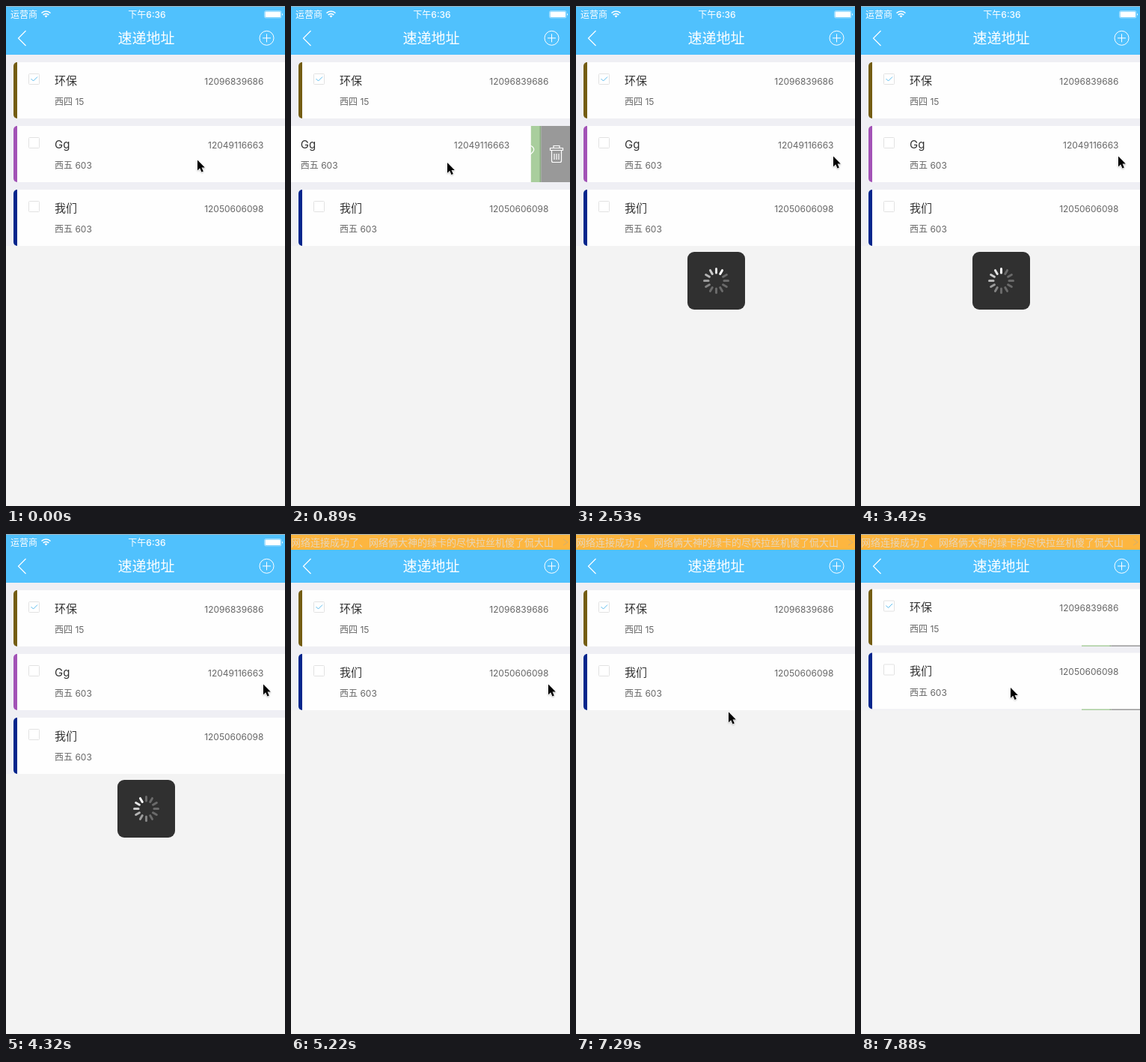
Recreate the animation shown at these times as an HTML page. Size 373x667 px, loop 8000 ms.

```html
<!DOCTYPE html>
<html lang="zh-CN">
<head>
<meta charset="utf-8">
<title>速递地址</title>
<style>
  html, body { margin: 0; width: 100%; height: 100%; overflow: hidden; background: #f3f3f3; }
  svg { display: block; }
  text { font-family: Inter, "Noto Sans CJK SC", "Noto Sans CJK", sans-serif; white-space: pre; }
  .name { font-size: 15px; fill: #333; }
  .info { font-size: 12px; fill: #666; }
  .title { font-size: 19px; font-weight: 300; fill: #fff; }
  .status { font-size: 12px; fill: #fff; }
  .notice { font-size: 13px; font-weight: 300; fill: #e6d6ba; }
  .line { fill: none; stroke: #fff; stroke-width: 1.2; }
</style>
</head>
<body>
<svg width="373" height="667" viewBox="0 0 373 667">
  <defs>
    <linearGradient id="edge">
      <stop offset="0" stop-opacity="0"/>
      <stop offset="1" stop-opacity=".25"/>
    </linearGradient>
    <g id="menu">
      <rect x="295" width="39.5" height="75" fill="#a9ce9d"/>
      <rect x="331.5" width="3" height="75" fill="url(#edge)"/>
      <rect x="334.5" width="39" height="75" fill="#999"/>
      <g class="line">
        <path d="M316.5 27.5a5 5 0 0 1 7 7L312.5 45.5l-8.5 1.5 1.5-8.5z"/>
        <path d="M346.5 29.5h17v3h-17zM351 29.5v-3h8v3M348.500 32.500v14q0 2 2 2h9q2 0 2-2v-14M352 37v8M355 37v8M358 37v8"/>
      </g>
    </g>
  </defs>

  <rect width="373" height="667" fill="#f3f3f3"/>
  <g id="rows"></g>

  <rect width="373" height="65" fill="#50c1fd"/>
  <text class="status" x="6" y="15.5" font-weight="300">运营商</text>
  <path class="line" d="M47.5 9.5a8.5 8.5 0 0 1 12 0M49.7 11.9a5.4 5.4 0 0 1 7.6 0" style="stroke-width:1.7"/>
  <path d="M53.5 15.5l-2-2.2q2-1.6 4 0z" fill="#fff"/>
  <text class="status" x="188.5" y="15.5" text-anchor="middle" font-weight="500">下午6:36</text>
  <rect x="345.5" y="6.5" width="22.5" height="9.5" rx="2" fill="none" stroke="#fff" stroke-opacity=".45"/>
  <rect x="346.5" y="7.5" width="20.5" height="7.5" rx="1" fill="#fff"/>
  <path d="M369 9.7q2 1.5 0 3z" fill="#fff"/>

  <path class="line" d="M26.5 33L16.5 43l10 10"/>
  <text class="title" x="187.5" y="50" text-anchor="middle">速递地址</text>
  <g class="line" style="stroke-width:1">
    <circle cx="348.5" cy="42.800" r="9.5"/>
    <path d="M343 42.800h11M348.5 37.300v11"/>
  </g>

  <g id="banner">
    <rect y="1" width="373" height="20" fill="#fdb640"/>
    <text class="notice" x="0" y="16">网络连接成功了、网络俩大神的绿卡的尽快拉丝机傻了侃大山</text>
    <path d="M364 7l6 4-6 4" fill="none" stroke="#d3b070"/>
  </g>
  <rect width="373" height="1" fill="#a3b4bd"/>

  <g id="hud">
    <rect x="149" y="328" width="77" height="77" rx="9" fill="#303030"/>
    <g id="spinner" transform="translate(187.5 366.5)" stroke="#fff" stroke-width="3" stroke-linecap="round"></g>
  </g>

  <path id="cursor" d="M.5 1V14.800L3.700 11.800 6 17 8.300 16 6 11H10.300Z"
        stroke="#fff" paint-order="stroke" style="filter:drop-shadow(0 1px 1px #0004)"/>
</svg>

<script>
const LOOP = 8000, STEP = 148.8, LEAD = 9;
const $ = id => document.getElementById(id);
const shift = (el, x, y) => el.setAttribute('transform', `translate(${x} ${y})`);
const fade = (el, alpha) => el.setAttribute('opacity', alpha);
const mix = (a, b, p) => a + (b - a) * p;
const ramp = (k, from, to) => Math.min(1, Math.max(0, (k - from) / (to - from)));
const ease = (k, from, to) => {
  const p = ramp(k, from, to);
  return p * p * (3 - 2 * p);
};

const contacts = [
  { name: '环保', phone: '12096839686', place: '西四 15', color: '#735c12', checked: true },
  { name: 'Gg', phone: '12049116663', place: '西五 603', color: '#a252b6' },
  { name: '我们', phone: '12050606098', place: '西五 603', color: '#00258c' },
];

$('rows').innerHTML = contacts.map(c => `
  <g>
    <rect y="-10" width="373" height="85" fill="#efeff4"/>
    <use href="#menu"/>
    <g>
      <rect x="15" width="358" height="75" fill="#fefefe"/>
      <path d="M15 0V75a5 5 0 0 1-5-5V5a5 5 0 0 1 5-5" fill="${c.color}"/>
      <rect x="30.5" y="15.5" width="14" height="14" rx="1" fill="#fff" stroke="#e2e2e2"/>
      ${c.checked ? '<path d="M33.5 22l3 3 5.5-5.5" fill="none" stroke="#5bbcee"/>' : ''}
      <text class="name" x="65" y="29.700">${c.name}</text>
      <text class="info" x="65" y="57.300">${c.place}</text>
      <text class="info" x="344.5" y="29.5" text-anchor="end">${c.phone}</text>
    </g>
  </g>`).join('');

$('spinner').innerHTML = Array.from({ length: 12 }, (_, i) =>
  `<path d="M0-10.5V-16" transform="rotate(${i * 30})"/>`).join('');

const rows = [...$('rows').children];
const cards = rows.map(row => row.lastElementChild);
const spokes = [...$('spinner').children];

const moves = [
  { from: 0, to: 6, x: 208.5, y: 208 },
  { from: 8, to: 12, x: 343.5, y: 199.5 },
  { from: 37, to: 40, x: 203.5, y: 182.5 },
  { from: 45.4, to: 50, x: 203.5, y: 244 },
  { from: 50, to: 53, x: 199.5, y: 204 },
];

function moveCursor(k) {
  let x = 255.5, y = 204.5;
  for (const m of moves) {
    const p = ease(k, m.from, m.to);
    x = mix(x, m.x, p);
    y = mix(y, m.y, p);
  }
  shift($('cursor'), x, y);
}

function spin(k) {
  const head = Math.floor(k * STEP * 12 / 1000 + 7.3);
  spokes.forEach((spoke, i) => {
    const age = (head - i + 12) % 12;
    fade(spoke, Math.max(0.28, 1 - age * 0.12));
  });
}

function draw(now) {
  const k = Math.floor((now % LOOP + LEAD) / STEP);
  const swipe = -78 * (ramp(k, 1.5, 7) ** 2 - ease(k, 14, 17));
  const lift = -3 * Math.sin(Math.PI * ramp(k, 50, 53.6));

  [75, 160, mix(245, 160, ease(k, 30, 33))].forEach((top, i) => {
    shift(rows[i], 0, top);
    shift(cards[i], i === 1 ? swipe : 0, lift);
  });
  fade(rows[1], 1 - ramp(k, 30, 33));
  shift($('banner'), 0, -21 * (1 - ease(k, 30, 34)));
  fade($('hud'), ramp(k, 14, 16) - ramp(k, 29, 31));
  spin(k);
  moveCursor(k);
}

const start = performance.now();
function tick() {
  draw(performance.now() - start);
  requestAnimationFrame(tick);
}
tick();
</script>
</body>
</html>
```
